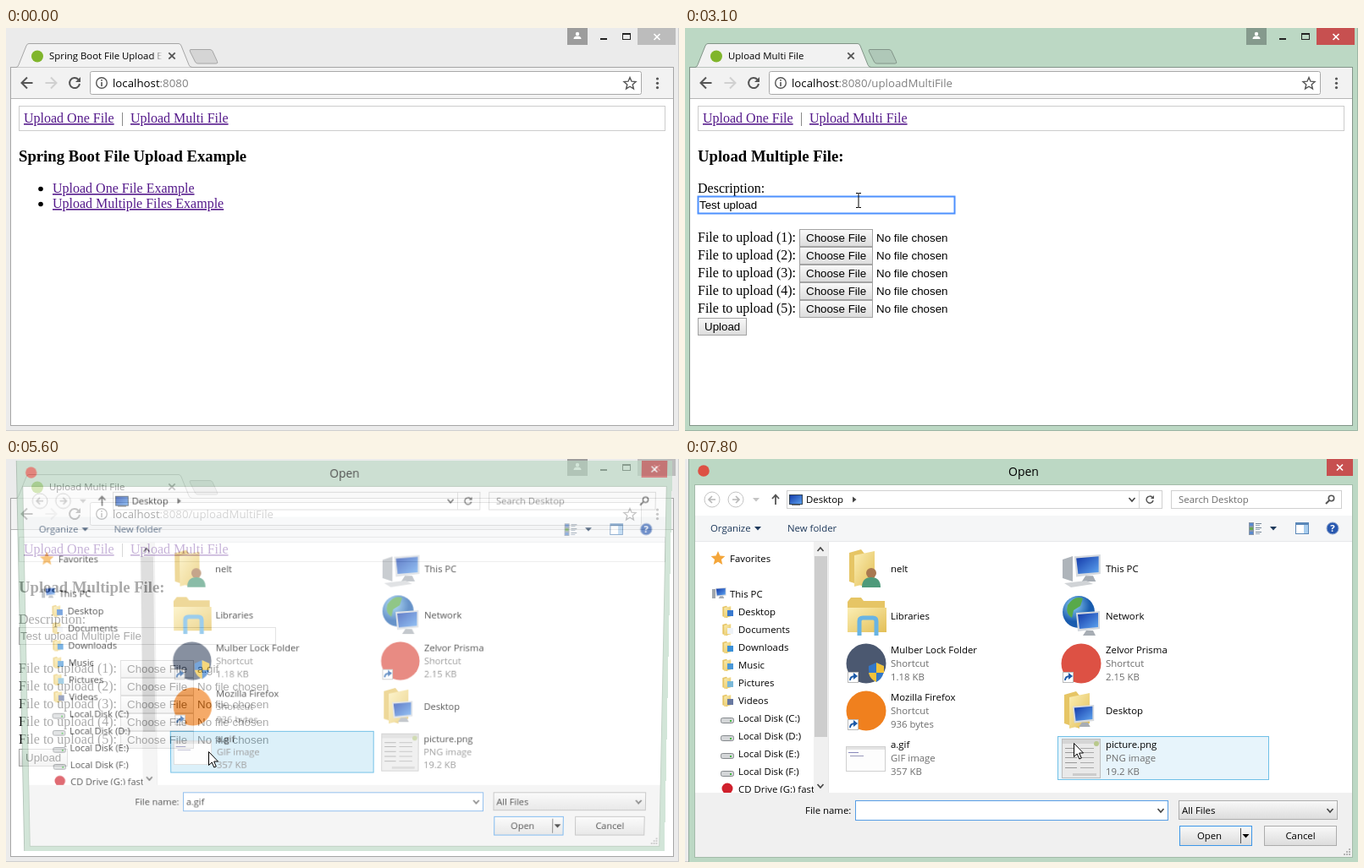
An HTML page for the animation above (8000 ms loop, 795 px wide and 477 px high).

```html
<!DOCTYPE html>
<html lang="en">
<head>
<meta charset="utf-8">
<title>Multi file upload</title>
<style>
html, body { margin: 0; width: 100%; height: 100%; overflow: hidden; background: #ebebeb; }
svg { position: absolute; left: 0; top: 0; width: 795px; height: 477px; }
.dialog { transform-origin: 400px 238px; }
text { fill: #000; }
.u { font: 11.4px "Open Sans", "Noto Sans", sans-serif; }
.url { font: 13.27px "Open Sans", "Noto Sans", sans-serif; }
.title { font: 14px "Open Sans", "Noto Sans", sans-serif; }
.serif { font: 16px "Liberation Serif", serif; }
.link { font: 16px "Liberation Serif", serif; fill: #551a8b; text-decoration: underline; }
.head { font: bold 18.72px "Liberation Serif", serif; }
.form { font: 13.333px "Liberation Sans", sans-serif; }
.dim { fill: #6d6d6d; }
.navy { fill: #1e395b; }
.mid { text-anchor: middle; }
</style>
</head>
<body>
<div id="stage"></div>
<script>
const TEAL = '#bcd8c4', RED = '#c75050';
const clamp = v => Math.max(0, Math.min(1, v));

// Drawing helpers, each returns SVG markup
const text = (x, y, s, cls = 'u') => `<text x="${x}" y="${y}" class="${cls}">${s}</text>`;
const rect = (x, y, w, h, fill, rx = 0) =>
  `<rect x="${x}" y="${y}" width="${w}" height="${h}" rx="${rx}" fill="${fill}"/>`;
const box = (x, y, w, h, fill, stroke, rx = 0, sw = 1) =>
  `<rect x="${x + .5}" y="${y + .5}" width="${w - 1}" height="${h - 1}" rx="${rx}" fill="${fill}" stroke="${stroke}" stroke-width="${sw}"/>`;
const line = (d, stroke, w = 1, fill = 'none') =>
  `<path d="${d}" fill="${fill}" stroke="${stroke}" stroke-width="${w}"/>`;
const shape = (d, fill) => `<path d="${d}" fill="${fill}"/>`;
const dot = (x, y, r, fill, stroke = 'none', w = 1) =>
  `<circle cx="${x}" cy="${y}" r="${r}" fill="${fill}" stroke="${stroke}" stroke-width="${w}"/>`;
const at = (x, y, s, k = 1) => `<g transform="translate(${x} ${y}) scale(${k})">${s}</g>`;
const cross = (x, y, r, c, w) => line(`M${x - r} ${y - r}l${2 * r} ${2 * r}m0 ${-2 * r}l${-2 * r} ${2 * r}`, c, w);
const chevron = (x, y, c = '#444') => line(`M${x - 3.5} ${y - 2}l3.5 4 3.5 -4`, c, 1.6);
const tri = (x, y, c = '#1e395b') => shape(`M${x - 4} ${y - 2}h8l-4 4.5z`, c);
const reload = (x, y, r, c, w) =>
  line(`M${x + r * .75} ${y - r * .66}A${r} ${r} 0 1 0 ${x + r} ${y + 1}`, c, w) +
  shape(`M${x + r + 1} ${y - r - 1}v${r}h${-r}z`, c);
const arrow = (x, y, d, c, r, w) =>
  line(`M${x - d * r} ${y}h${2 * d * r}M${x} ${y - r}l${d * r} ${r} ${-d * r} ${r}`, c, w);

const DEFS = `<defs>
  <linearGradient id="btn" x2="0" y2="1"><stop stop-color="#f9f9f9"/><stop offset="1" stop-color="#dcdcdc"/></linearGradient>
  <linearGradient id="fade"><stop stop-color="#f2f2f2" stop-opacity="0"/><stop offset="1" stop-color="#f2f2f2"/></linearGradient>
  <linearGradient id="screen" x2="1" y2="1"><stop stop-color="#1238a8"/><stop offset="1" stop-color="#5ea4f0"/></linearGradient>
  <linearGradient id="paper" x2="1" y2="1"><stop stop-color="#fbeeb4"/><stop offset="1" stop-color="#e3bf56"/></linearGradient>
  <radialGradient id="globe" cx=".35" cy=".3"><stop stop-color="#8fd0f5"/><stop offset="1" stop-color="#1a5cae"/></radialGradient>
</defs>`;

// Icons in a 48 px cell
const screen = (x, y, k) => at(x, y,
  shape('M0 2L28 0V21L2 24z', '#d5d9de') + shape('M2 4L26 2V19L4 21z', 'url(#screen)') +
  shape('M12 23h8l3 6H8z', '#a7adb4'), k);
const folder = shape('M4 6l14-4 4 5V46L4 40z', '#e6c565') + shape('M10 9L34 4V40L10 46z', 'url(#paper)');
const shortcut = box(2, 35, 13, 13, '#fff', '#bbb') + line('M5 45q0-5 6-5', '#1c5aa8', 2) + shape('M9 36l5 4-5 4z', '#1c5aa8');
const badge = (c, extra = '') => dot(24, 25, 23.5, c) + extra + shortcut;
const shield = shape('M27 28l9-4 9 4q1 14-9 19q-10-5-9-19', '#3377c8') +
  shape('M36 24l9 4v8h-9zM36 36v11q-8-4-9-11z', '#f2c33a');
const thumb = box(0, 11, 47, 30, '#fdfdfd', '#cfcfcf') + rect(1, 12, 45, 3, '#e4e4e4') +
  rect(3, 18, 12, 1, '#8888bb') + rect(5, 22, 16, 1, '#9999bb');
const form = box(1, 2, 46, 47, '#e9e9e9', '#bdbdbd') + rect(2, 3, 44, 5, '#d5d5d5') + dot(42, 8, 3, '#b9c98c') +
  [13, 18, 24, 30, 36].map(y => rect(5, y, 14, 1, '#999') + rect(23, y, 16, 1, '#aaa')).join('') + rect(14, 43, 28, 3, '#ccc');

const FILES = [
  ['nelt', folder + dot(30, 30, 6, '#a87850') + shape('M19 47q0-12 11-12t11 12z', '#4e9a7a')],
  ['This PC', screen(16, 8, 1.1) + shape('M2 14l12-4v30l-12-4z', '#aeb4ba') + shape('M4 42l26-3 8 4-26 4z', '#d0d3d6')],
  ['Libraries', shape('M2 8l4-5h12l3 4h25v36H2z', '#e6c565') + rect(2, 15, 46, 29, 'url(#paper)') +
    line('M16 48V31q0-4 4-4h12q4 0 4 4v17', '#68b4e4', 5)],
  ['Network', dot(21, 20, 19, 'url(#globe)') + shape('M8 12q8-12 18-8l-3 9-8 5-2 9q-8-5-5-15', '#58a94a') + screen(18, 19, 1)],
  ['Mulber Lock Folder', badge('#4b5870', shield), 'Shortcut', '1.18 KB'],
  ['Zelvor Prisma', badge('#dd5144'), 'Shortcut', '2.15 KB'],
  ['Mozilla Firefox', badge('#f0801e'), 'Shortcut', '936 bytes'],
  ['Desktop', folder + screen(14, 18, .9)],
  ['a.gif', thumb, 'GIF image', '357 KB'],
  ['picture.png', form, 'PNG image', '19.2 KB']
];
const PLACES = ['Desktop', 'Documents', 'Downloads', 'Music', 'Pictures', 'Videos'];
const DISKS = ['Local Disk (C:)', 'Local Disk (D:)', 'Local Disk (E:)', 'Local Disk (F:)'];

// Pointer path: time, x, y
const PATH = [
  [200, 788, 30], [1000, 187, 104], [1600, 191, 111], [2200, 191, 111], [2800, 205, 204], [3300, 205, 204],
  [3600, 182, 251], [4500, 182, 251], [4800, 242, 317], [5000, 239, 346], [5900, 239, 346], [6400, 279, 322],
  [6800, 187, 293], [7400, 187, 293], [7800, 459, 336]
];
function pointer(t) {
  const i = PATH.findIndex(k => k[0] > t);
  if (i < 0) return PATH[PATH.length - 1].slice(1);
  const [t0, x0, y0] = PATH[i - 1], [t1, x1, y1] = PATH[i];
  const u = (t - t0) / (t1 - t0), e = u * u * (3 - 2 * u);
  return [Math.round(x0 + (x1 - x0) * e), Math.round(y0 + (y1 - y0) * e)];
}
const inside = ([px, py], x, y, w, h) => px >= x && px < x + w && py >= y && py < y + h;

function button(x, y, w, label, p) {
  return box(x, y, w, 21, 'url(#btn)', inside(p, x, y, w, 21) ? '#6a6a6a' : '#a3a3a3') + text(x + 8, y + 15, label, 'form');
}

function homePage() {
  return text(15, 158, 'Spring Boot File Upload Example', 'head') +
    dot(41, 190.5, 2.8, '#000') + text(55, 195, 'Upload One File Example', 'link') +
    dot(41, 208.5, 2.8, '#000') + text(55, 213, 'Upload Multiple Files Example', 'link');
}

function uploadPage(t, p) {
  const typed = 'Test upload Multiple File'.slice(0, Math.max(0, Math.floor((t - 2900) / 16)));
  const focus = t >= 3000 && t < 3900;
  let s = text(15, 158, 'Upload Multiple File:', 'head') + text(15, 195, 'Description:', 'serif') +
    box(15, 199, 304, 21, '#fff', focus ? '#4d90fe' : '#a9a9a9', 0, focus ? 2 : 1) +
    text(17, 214, typed, 'form');
  for (let i = 0; i < 5; i++) {
    const y = 238 + 21 * i;
    s += text(15, y + 15, `File to upload (${i + 1}):`, 'serif') + button(135, y, 87, 'Choose File', p) +
      text(226, y + 15, !i && t >= 5600 ? 'a.gif' : 'No file chosen', 'form');
  }
  return s + button(15, 343, 58, 'Upload', p);
}

function browser(t, p) {
  const active = t >= 1800 && t < 4100 || t >= 5800 && t < 7100;
  const upload = t >= 2200;
  const edge = active ? '#829488' : '#a5a5a5';
  return rect(0, 0, 795, 477, active ? TEAL : '#ebebeb') +
    line('M794.5 0V476.5H0', active ? '#9db5a5' : '#cfcfcf') +
    // window controls
    rect(663, 0, 24, 20, active ? '#859a8d' : '#9c9c9c') +
    dot(675, 7, 2.2, '#fff') + shape('M670.5 13q0-3.5 4.5-3.5t4.5 3.5z', '#fff') +
    rect(702, 12, 8, 2, '#222') + box(728, 6, 10, 8, 'none', '#222') + rect(728, 6, 10, 2, '#222') +
    rect(746, 0, 45, 20, active ? RED : '#bcbcbc') + cross(769, 10.5, 3.5, '#fff', 1.7) +
    // frame, tab strip and toolbar
    box(5, 46, 784, 425, '#fff', edge) + rect(6, 47, 782, 36, '#f2f2f2') + rect(6, 83, 782, 1, '#b6b6b6') +
    line('M6 46.5H12q2 0 3-3L24 21q1-2.500 3-2.500H204q2 0 3 2.500l9 22.500q1 3 4 3', edge, 1, '#f2f2f2') +
    rect(7, 47, 214, 2, '#f2f2f2') +
    line('M218 25.500h23q2 0 3 2l5.500 12q1 2.500-1 2.500h-22q-2 0-3-2l-6-12q-1-2.500.500-2.500z', edge, 1, active ? '#afc8b8' : '#d5d5d5') +
    dot(37, 33.5, 7, '#80b52c') +
    text(51, 37, upload ? 'Upload Multi File' : 'Spring Boot File Upload E') + rect(172, 24, 13, 18, 'url(#fade)') +
    cross(196, 33, 3.7, '#555', 1.8) +
    arrow(25, 65, -1, '#555', 6.5, 2) + arrow(53, 65, 1, '#d0d0d0', 6.5, 2) + reload(81, 65, 6, '#555', 2) +
    box(99, 51, 652, 28, '#fff', '#a9a9a9', 2) +
    dot(113, 65, 6.3, 'none', '#555', 1.4) + rect(112.2, 64, 1.6, 5, '#555') + rect(112.2, 61, 1.6, 1.7, '#555') +
    `<text x="126" y="70" class="url">localhost<tspan fill="#808080">:8080${upload ? '/uploadMultiFile' : ''}</tspan></text>` +
    line('M737 58.500l2 4.700 5 .4-3.800 3.300 1.200 5-4.400-2.700-4.400 2.700 1.200-5-3.800-3.300 5-.4z', '#555', 1.4) +
    [60, 65.3, 70.6].map(y => dot(769.5, y, 1.6, '#555')).join('') +
    // page
    box(15, 92, 764, 30, '#fff', '#ccc') + text(21, 112, 'Upload One File', 'link') +
    text(136, 112, '|', 'serif dim') + text(147, 112, 'Upload Multi File', 'link') +
    (upload ? uploadPage(t, p) : homePage()) +
    (t >= 1100 && !upload ? line('M6 447.500H263q2.500 0 2.500 2.500V469.500H6z', '#cfcfcf', 1, '#f2f2f2') +
      `<text x="10" y="463" class="u dim" style="font-size:11.38px">localhost:8080/uploadMultiFile</text>` : '');
}

function sidebar() {
  const row = i => 185 + 21 * i;
  return shape('M39 109l2.400 5.500 6 .5-4.500 4 1.400 6-5.300-3.300-5.300 3.300 1.400-6-4.500-4 6-.5z', '#f4a63a') +
    text(53, 122, 'Favorites') + rect(32, 154, 4, 11, '#a0a6ad') + screen(36, 152, .45) + text(53, 164, 'This PC') +
    PLACES.map((s, i) => at(43, row(i) - 12, folder, .33) +
      rect(50, row(i) - 6, 7, 7, ['#3a7ad0', '#eef2f6', '#3a90d8', '#4a98d8', '#7ab8d8', '#6878a0'][i]) +
      text(63, row(i), s)).join('') +
    DISKS.map((s, i) => box(42, row(i + 6) - 5, 16, 7, '#d4d6d8', '#85898d', 2) +
      rect(53, row(i + 6) - 2, 2, 2, '#4b4') + text(63, row(i + 6) - 0, s)).join('') +
    dot(50, 390, 6.5, '#d0202c') + text(63, 395, 'CD Drive (G:) fast') +
    rect(152, 98, 17, 297, '#f0f0f0') + rect(153, 115, 15, 214, '#cdcdcd') +
    chevron(160, 387) + line('M156.500 109l3.500-4 3.500 4', '#444', 1.6) + rect(169, 98, 1, 297, '#e8e8e8');
}

function tile(file, i, t, p, ready) {
  const [name, icon, kind, size] = file, x = i % 2 ? 440 : 186, y = 104 + 56 * (i >> 1);
  const picked = i === 8 && t >= 5100 && t < 6000;
  const hover = ready && inside(p, x, y, 250, 52);
  return (picked ? box(x, y, 250, 52, '#cbe8f6', '#26a0da') : hover ? box(x, y, 250, 52, '#e7f4fb', '#70c0e7') : '') +
    at(x + 4, y + 1, icon) + text(x + 57, y + (kind ? 14 : 30), name) +
    (kind ? text(x + 57, y + 30, kind, 'u dim') + text(x + 57, y + 46, size, 'u dim') : '');
}

function dialog(t, p, ready) {
  const since = t < 6500 ? t - 4100 : t - 7100;
  const picked = t >= 5200 && t < 6000;
  return rect(4, 0, 791, 477, TEAL) + rect(4, 0, 1, 477, '#93aa9b') +
    dot(22, 14, 6.8, '#dd5144') + text(400, 20, 'Open', 'title mid') +
    rect(758, 0, 31, 20, RED) + cross(773.5, 10, 3.5, '#fff', 1.7) +
    box(11, 30, 778, 442, '#fff', '#a3bba9') +
    // address row
    dot(32, 48, 9, '#fff', '#c4c4c4') + arrow(32, 48, -1, '#b8b8b8', 4, 1.7) +
    dot(60, 48, 9, '#fff', '#c4c4c4') + arrow(60, 48, 1, '#b8b8b8', 4, 1.7) + tri(84, 48, '#c4c4c4') +
    line('M107 54V43M103 47l4-4.500 4 4.500', '#555', 1.8) +
    box(120, 37, 444, 22, '#fff', '#d0d0d0') + rect(536, 38, 1, 20, '#d9d9d9') +
    box(123, 42, 16, 12, 'url(#screen)', '#345') + rect(126, 54, 10, 1, '#777') +
    text(143, 52, 'Desktop') + shape('M198 44.500l4.500 3.500-4.500 3.500z', '#444') + chevron(528, 48) + reload(549, 48, 4, '#555', 1.5) +
    box(574, 37, 202, 22, '#fff', '#d0d0d0') + text(583, 52, 'Search Desktop', 'u dim') +
    dot(763.5, 46.5, 3.2, 'none', '#555', 1.6) + line('M761 49l-4 4', '#555', 2) +
    // command row
    rect(12, 67, 776, 30, '#f5f6f7') + rect(12, 97, 776, 1, '#e6e8ea') +
    text(30, 86, 'Organize', 'u navy') + tri(86, 82) + text(121, 86, 'New folder', 'u navy') +
    [75, 80, 85].map((y, i) => box(666, y, 6, 5, ['#5a8ad0', '#69a84f', '#5a8ad0'][i], '#8896a8') +
      rect(674, y + 1, 7, 1, '#789') + rect(674, y + 3, 5, 1, '#9ab')).join('') + tri(695, 82) +
    box(721, 75, 16, 14, '#fff', '#5a87b8') + rect(721, 75, 16, 3, '#5a87b8') + rect(731, 78, 5, 10, '#a8cdee') +
    dot(765, 82, 7, '#2858b0', '#8fa6cc') + text(765, 86, '?', 'u mid" style="fill:#fff;font-weight:bold') +
    sidebar() + FILES.map((f, i) => tile(f, i, t, p, ready)).join('') +
    // footer
    rect(12, 395, 776, 76, '#f0f0f0') + text(142, 420, 'File name:') +
    box(201, 404, 370, 24, '#fff', '#569de5') + chevron(562, 416) +
    (picked ? text(205, 420, 'a.gif') : since % 1000 < 500 ? rect(204, 409, 1, 14, '#000') : '') +
    box(583, 404, 188, 23, 'url(#btn)', '#acacac') + text(587, 420, 'All Files') + chevron(762, 416) +
    box(584, 434, 86, 24, 'url(#btn)', '#3c96e8') + rect(656, 437, 1, 18, '#555') + tri(662.5, 446, '#000') + text(619.5, 450, 'Open', 'u mid') +
    box(684, 434, 86, 24, 'url(#btn)', '#acacac') + text(727, 450, 'Cancel', 'u mid') +
    [0, 1, 2].map(i => [0, 1, 2].slice(0, i + 1).map(j => rect(784 - 3 * j, 461 + 3 * i, 2, 2, '#b4b4b4')).join('')).join('');
}

function scene(t) {
  const p = t < 200 ? [-50, -50] : pointer(t);
  const show = t < 6500 ? Math.min(clamp((t - 4100) / 250), clamp((5800 - t) / 300)) : clamp((t - 7100) / 250);
  const away = (1 - show) / .6;
  const beam = !show && t >= 2200 && inside(p, 15, 199, 304, 21);
  const tip = beam ? line('M-3 -8.500h2.500l.500 .5 .5-.5h2.500M0 -8V8M-3 8.500h2.500l.500-.5 .5 .5h2.500', '#000')
    : line('M.5 .5V16.500L4.200 13 6.800 19 9.300 18 6.700 12H11.500z', '#000', 1, '#fff');
  return `<svg>${DEFS}${browser(t, show ? [-50, -50] : p)}</svg>` +
    (show ? `<svg class="dialog" style="opacity:${show};transform:translateY(${-5 * away}px) perspective(1000px) rotateX(${-5.5 * away}deg) scale(${1 - .057 * away})">${dialog(t, p, show === 1)}</svg>` : '') +
    `<svg>${at(p[0], p[1], tip)}</svg>`;
}

const stage = document.getElementById('stage');
let last = -1;
function frame() {
  const t = Math.floor(performance.now() % 8000 / 100) * 100;
  if (t !== last) stage.innerHTML = scene(last = t);
  requestAnimationFrame(frame);
}
frame();
</script>
</body>
</html>
```
